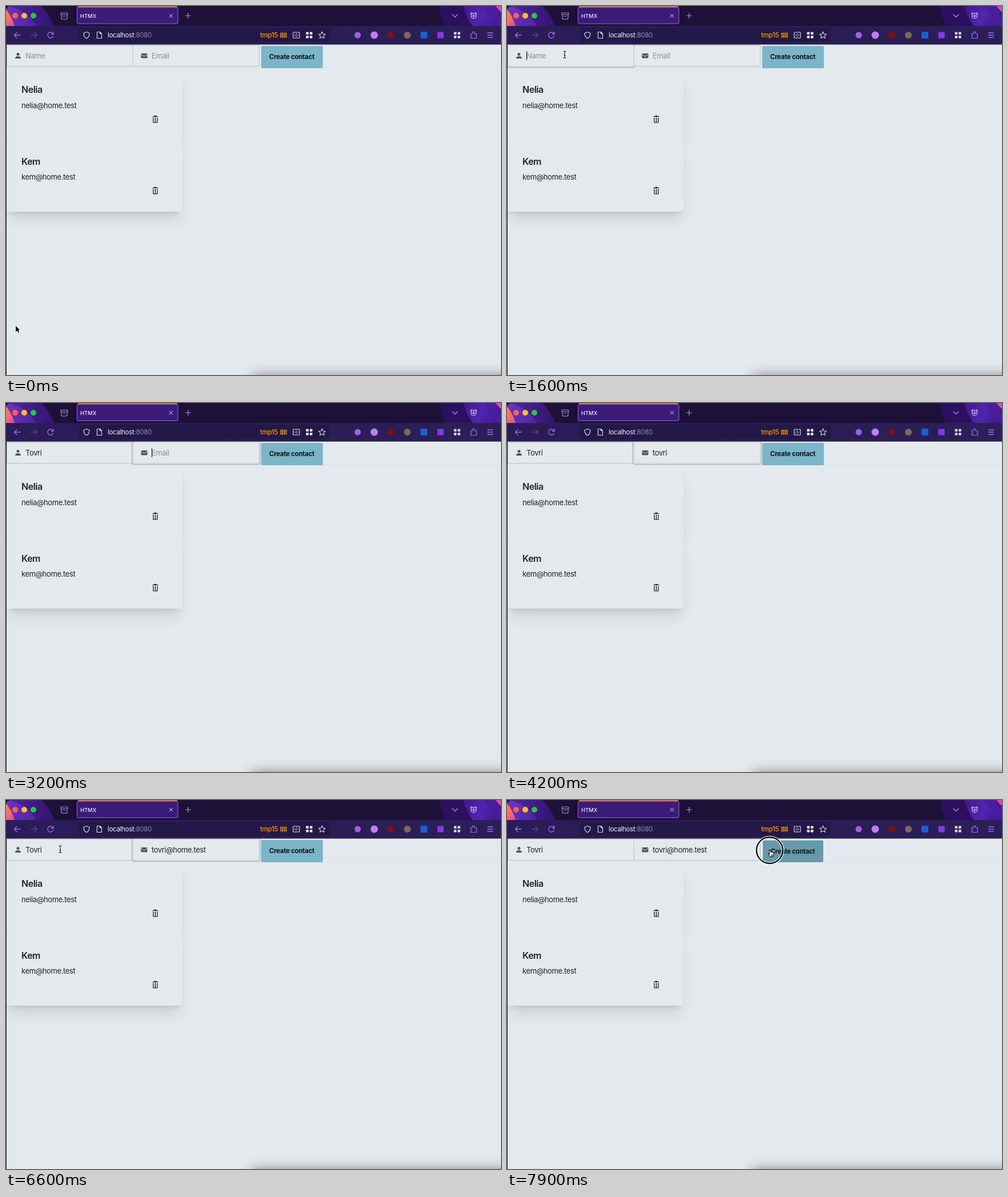
An HTML page with a canvas that plays this animation: 867x646 px, repeating every 8000 ms.

```html
<!DOCTYPE html>
<html lang="en">
<head>
<meta charset="utf-8">
<title>Contacts</title>
<style>
  html, body { margin: 0; width: 100%; height: 100%; overflow: hidden; }
  body { position: relative; background: #e4e9ee; font-family: Inter, "Open Sans", sans-serif; }
  canvas { position: absolute; left: 0; top: 0; }
  #page { position: absolute; left: 1px; top: 67px; width: 866px; height: 579px; overflow: hidden; background: #e4e9ee; }
  #page > * { position: absolute; box-sizing: border-box; }
  #row { left: 0; top: 0; width: 866px; height: 42px; border-bottom: 1px solid #dce1e6; }
  .field { top: 1px; height: 38px; width: 222px; border: 1px solid #b9bec4; border-radius: 2px; background: #e4e9ee; }
  .focus { outline: 1px solid #a0a5ab; outline-offset: 1px; border-color: #c3c8cd; }
  #button { left: 446px; top: 3px; width: 108px; height: 38.5px; border-radius: 2px; }
  .card { left: 0; width: 308px; height: 125px; border-radius: 4px; background: #e4e9ee;
    box-shadow: 0 18px 23px -4px rgba(0,0,0,.1), 0 7px 9px -5px rgba(0,0,0,.1); }
  #dock { left: 428px; top: 581px; width: 520px; height: 60px; border-radius: 8px; box-shadow: 0 0 22px rgba(0,0,0,.5); }
  .text { position: absolute; white-space: pre; line-height: 16px; }
  .text.caret { border-right: 1px solid #111; }
</style>
</head>
<body>
<div id="page">
  <div id="row"></div>
  <div id="name" class="field" style="left:0"></div>
  <div id="email" class="field" style="left:221px"></div>
  <div id="button"></div>
  <div class="card" style="top:43px"></div>
  <div class="card" style="top:168px"></div>
  <div id="dock"></div>
</div>
<canvas id="base" width="867" height="646"></canvas>
<div id="labels"></div>
<canvas id="top" width="867" height="646"></canvas>
<script>
const $ = id => document.getElementById(id);
const base = $('base').getContext('2d');
const over = $('top').getContext('2d');

function line(c, color, width, d) {
  c.strokeStyle = color;
  c.lineWidth = width;
  c.lineCap = c.lineJoin = 'round';
  c.stroke(new Path2D(d));
}
function shape(c, color, d) {
  c.fillStyle = color;
  c.fill(new Path2D(d));
}
function disc(color, x, y, r) {
  base.fillStyle = color;
  base.beginPath();
  base.arc(x, y, r, 0, 7);
  base.fill();
}
function box(color, x, y, w, h, r = 0) {
  base.fillStyle = color;
  base.beginPath();
  base.roundRect(x, y, w, h, r);
  base.fill();
}
function ramp(x0, y0, x1, y1, ...colors) {
  const g = base.createLinearGradient(x0, y0, x1, y1);
  colors.forEach((c, i) => g.addColorStop(i / (colors.length - 1), c));
  return g;
}
function label(str, x, y, size, color, weight = 400, track = -0.03) {
  const s = document.createElement('span');
  s.className = 'text';
  s.textContent = str;
  s.style.cssText = `left:${x}px;top:${y - 8}px;font-size:${size}px;color:${color};` +
    `font-weight:${weight};letter-spacing:${track}em`;
  return $('labels').appendChild(s);
}

const violet = '#a56bf5', pale = '#d9d3ee';

function drawTabs() {
  base.save();
  base.beginPath();
  base.rect(0, 0, 867, 35);
  base.clip();
  box('#1d1138', 0, 0, 867, 35);
  disc(ramp(10, 0, 84, 0, '#4c249c', '#3f1c86', '#33156c'), 0, 64, 89);
  disc(ramp(0, 10, 60, 35, '#6a35c0', '#4a2398'), -6, 66, 66);
  shape(base, ramp(0, 6, 22, 35, '#ff8a3c', '#ff6a66', '#b04ab8'), 'M0 6Q10 18 15 35H0Z');
  disc('#2c1060', 890, -20, 133);
  disc(ramp(800, 0, 867, 35, '#42168f', '#5124ae', '#3d168a'), 890, -20, 91);
  shape(base, '#4a1c9e', 'M836 0H850L867 20V35H862Z');
  disc(ramp(852, 0, 867, 18, '#d043b0', '#ff5577'), 890, -20, 38);
  base.restore();
  shape(base, '#111', 'M0 0H7Q1 1 0 8Z');

  disc('#ff5f57', 16, 17, 5);
  disc('#febc2e', 32, 17, 5);
  disc('#28c840', 48, 17, 5);
  line(base, '#a88ad8', 1.2, 'M97 12H107Q108 12 108 13V15H96V13Q96 12 97 12M97 15V21Q97 23 99 23H105Q107 23 107 21V15M100 18H104');
  line(base, '#0f0824', 1, 'M120.5 0V35');
  box('#ff9a12', 126, 0, 174, 1.4);
  box('#3a1c78', 124, 2, 177.5, 29.5, 3);
  line(base, '#9a5cf0', 1, 'M126 2.5H299Q301 2.5 301 4.5V29Q301 31 299 31H126.5Q124.5 31 124.5 29V4.5Q124.5 2.5 126.5 2.5Z');
  line(base, '#d9c8f8', 1, 'M286 14L292 20M292 14L286 20');
  line(base, '#b58af5', 1.2, 'M314.5 17H323.5M319 12.5V21.5M782 15L786.5 19.5L791 15');
  line(base, pale, 1.2, 'M823.5 17.5A4.5 4.5 0 1 0 814.5 17.5A4.5 4.5 0 1 0 823.5 17.5M819 15V20M816.5 17.5H821.5M813.5 14L816 11.5M824.5 14L822 11.5');
}

function drawToolbar() {
  box(ramp(0, 0, 867, 0, '#2b1c58', '#2a1e54', '#2b1f58'), 0, 35, 867, 32);
  box('#20163f', 0, 66.5, 867, 1);
  box('#231948', 128, 38, 439, 26, 4);
  line(base, violet, 1.3, 'M25 51H15M19 46.5L14.5 51L19 55.5M82.5 49A5 5 0 1 0 82.5 53M83 46V49.5H79.5');
  line(base, '#594589', 1.3, 'M44 51H54M50 46.5L54.5 51L50 55.5');
  line(base, pale, 1.2, 'M141 45.5L146 47.5C146 52 144.5 55 141 56.7C137.5 55 136 52 136 47.5Z');
  line(base, pale, 1.2, 'M159.5 45.5H164.5L167.5 48.5V56.5H159.5ZM164.5 45.5V48.5H167.5');
  line(base, '#ff9500', 1.2, 'M481.5 46.5V55.5M484.5 46.5V55.5M487.5 46.5V55.5M490.5 46.5V55.5M480 49H492M480 53H492');
  line(base, pale, 1.2, 'M504 46H513Q514 46 514 47V55Q514 56 513 56H504Q503 56 503 55V47Q503 46 504 46M505.5 51H507.5M509.5 51H511.5M508.5 48V49M508.5 53V54');
  grid(531, '#eee9fa');
  line(base, pale, 1.1, 'M553.5 45L555.2 49L559.5 49.4L556.3 52.2L557.2 56.4L553.5 54.2L549.8 56.4L550.7 52.2L547.5 49.4L551.8 49Z');

  disc('#a15fe6', 616, 51, 5.5);
  disc('#c27cf5', 645, 51, 6.5);
  disc('#7d1016', 674, 51, 6);
  disc('#80665c', 703, 51, 6);
  box('#1b5fd0', 726, 45, 12, 12, 2);
  box('#8438e8', 755.5, 45.5, 11, 11, 1);
  grid(790, '#ddd0f5');
  line(base, violet, 1.2, 'M814 48.5H817V47A1.8 1.8 0 0 1 820.8 47V48.5H824V56.5H814V54A1.8 1.8 0 0 0 814 50.5Z');
  line(base, violet, 1.3, 'M843.5 47H852.5M843.5 51H852.5M843.5 55H852.5');
}

function grid(x, color) {
  for (const [dx, dy] of [[-5.5, -5.5], [1, -5.5], [-5.5, 1], [1, 1]]) box(color, x + dx, 51 + dy, 4.6, 4.6, 0.8);
}

function trash(y) {
  line(base, '#111', 1.2, `M257 ${y - 5}H266M260 ${y - 6.2}H263`);
  line(base, '#111', 1.2, `M258 ${y - 3}V${y + 5.5}H265V${y - 3}M261.5 ${y - 3}V${y + 5}`);
}

function drawPage() {
  box('#15121c', 0, 67, 1, 579);
  disc('#4d5258', 21, 84.5, 2.5);
  shape(base, '#4d5258', 'M16.2 92V90.6C16.2 87 25.8 87 25.8 90.6V92Z');
  box('#4d5258', 236.5, 83, 11, 8.2, 1.2);
  line(base, '#e4e9ee', 1, 'M237 85L242 88.3L247 85');
  trash(198.5);
  trash(323.5);
}

drawTabs();
drawToolbar();
drawPage();

label('HTMX', 130, 17.5, 9.4, '#f1ecfb', 500, 0);
label('localhost', 178, 51, 11.6, '#f0ecfa').insertAdjacentHTML('beforeend', '<span style="color:#9285b5">:8080</span>');
label('tmp15', 445, 51, 11.6, '#ff9500', 500);
const ink = '#20242b';
label('Nelia', 27, 146, 16, ink, 600);
label('nelia@home.test', 27, 174, 13, ink);
label('Kem', 27, 271.5, 16, ink, 600);
label('kem@home.test', 27, 299, 13, ink);
const nameText = label('', 34, 87, 13, ink);
const emailText = label('', 255, 87, 13, ink);
const buttonText = label('Create contact', 461, 89, 11.4, '#0c1418', 700, -0.02);

// Key press times of each field
const keys = {
  name: ['Tovri', [1900, 2100, 2200, 2300, 2600]],
  email: ['tovri@home.test', [3500, 3600, 3700, 3800, 4000, 4400,
    4600, 4750, 4850, 5000, 5150, 5300, 5600, 5700, 5800]]
};
const caretOff = [[1667, 1900], [4150, 4400], [6400, 6960], [7540, 8000]];
const clickName = 1100, tab = 2900, press = 7800;

const clamp = v => Math.max(0, Math.min(1, v));
const ease = v => { v = clamp(v); return v * v * (3 - 2 * v); };
const mix = (a, b, p) => a + (b - a) * p;

function setField(id, span, hint, focused, t) {
  const [word, times] = keys[id];
  const typed = word.slice(0, times.filter(k => k <= t).length);
  const blink = caretOff.some(([a, b]) => t >= a && t < b);
  span.textContent = typed || hint;
  span.style.color = typed ? ink : '#8c9299';
  span.classList.toggle('caret', focused && !blink && !!typed);
  $(id).classList.toggle('focus', focused);
  if (focused && !blink && !typed) line(over, '#111', 1, `M${parseFloat(span.style.left) + 0.5} 79.5V94.5`);
}

function pointer(kind, x, y) {
  over.save();
  over.translate(x, y);
  if (kind === 'arrow') {
    const d = 'M0 0V10.5L2.5 8.3L4.2 12L6 11.2L4.3 7.6H7.5Z';
    line(over, '#fff', 1.8, d);
    shape(over, '#000', d);
  } else if (kind === 'beam') {
    const d = 'M-2.5 -6Q0 -6 0 -4.5Q0 -6 2.5 -6M0 -4.5V4.5M-2.5 6Q0 6 0 4.5Q0 6 2.5 6M-1 1.5H1';
    line(over, 'rgba(255,255,255,.7)', 2.4, d);
    line(over, '#111', 1.1, d);
  } else {
    const d = 'M-2.8 -5Q-1.8 -6.6 -0.8 -5L0.2 -1.8Q1.3 -2.7 2 -1.4Q3.2 -2 3.8 -0.8Q5.2 -1 5.2 0.6V3Q4.8 5 4 6.4H-1.4Q-2.5 4.2 -4.6 1.8Q-4.8 0.2 -3.2 0.8L-1.8 2Z';
    shape(over, '#fff', d);
    line(over, '#111', 1.1, d);
    line(over, '#111', 0.8, 'M0.4 2.6V4.8M2 2.6V4.8M3.5 2.6V4.8');
  }
  over.restore();
}

function ring(x, y) {
  over.beginPath();
  over.arc(x, y, 23, 0, 7);
  over.strokeStyle = '#fff';
  over.lineWidth = 4.6;
  over.stroke();
  over.strokeStyle = '#0a0a0a';
  over.lineWidth = 2.4;
  over.stroke();
}

function drawPointer(t) {
  if (t < 1900) {
    const p = ease(t / 700), x = mix(17, 101, p), y = mix(560, 85, p);
    if (t >= clickName && t < 1300) ring(x, y);
    pointer(y < 106 ? 'beam' : 'arrow', x, y);
  } else if (t >= 6600) {
    const p = ease((t - 6600) / 900);
    const x = mix(95, 455, p) + 7 * ease((t - 7500) / 250);
    const y = mix(86, 93, p);
    if (t >= press) ring(x - 2, y - 5);
    pointer(x > 446 ? 'hand' : 'beam', x, y);
  }
}

function draw(t) {
  over.clearRect(0, 0, 867, 646);
  setField('name', nameText, 'Name', t >= clickName && t < tab, t);
  setField('email', emailText, 'Email', t >= tab && t < press, t);
  const p = t < press ? 0 : clamp((t - press + 60) / 150);
  $('button').style.background = `rgb(${mix(123, 102, p)},${mix(181, 153, p)},${mix(200, 170, p)})`;
  $('button').style.transform = `translateY(${0.4 * p}px) scale(${1 - 0.02 * p})`;
  buttonText.style.transform = `translateY(${p}px) scale(${1 - 0.02 * p})`;
  drawPointer(t);
}

const start = performance.now();
function loop() {
  draw((performance.now() - start) % 8000);
  requestAnimationFrame(loop);
}
loop();
</script>
</body>
</html>
```
